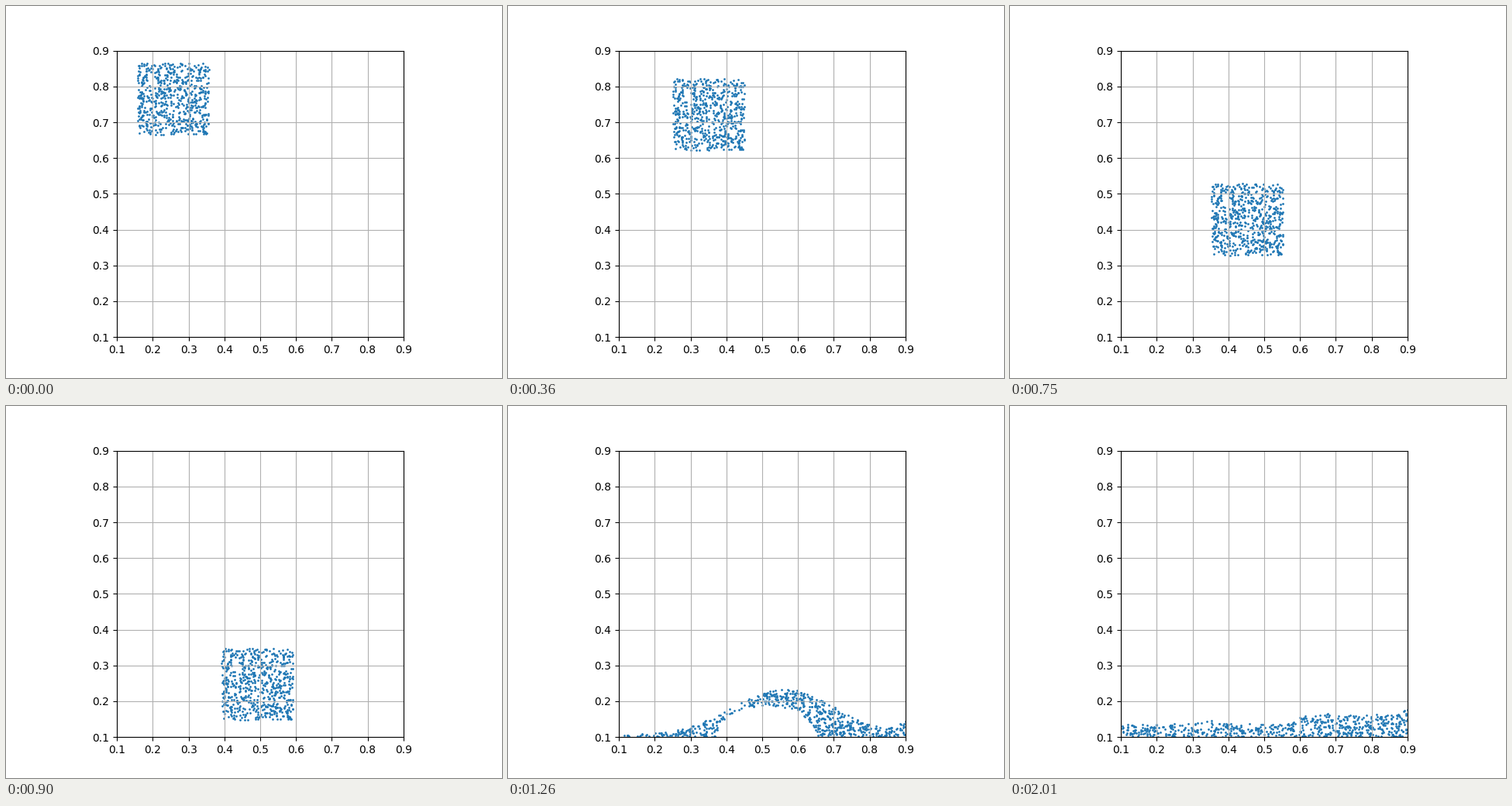
Animation of 640x480 px, one loop 2100 ms. Source, as a matplotlib script:

```python
import numpy as np
import matplotlib.pyplot as plt
from matplotlib.animation import FuncAnimation

FRAMES, STEP = 70, 30
LO, HI = 0.1, 0.9
IMPACT, LAST = 30, 67
SIDE = 0.2
START = np.array([0.1565, 0.6655])
VEL = np.array([0.00785, 0.00539])
GRAVITY = np.array([0, 0.00151])

rng = np.random.default_rng(7)
unit = rng.random((640, 2))


def flight(n):
    """Block in free flight."""
    return START + SIDE * unit + VEL * n - GRAVITY * n * n / 2


def hump(x, c, w, h, p=1.0):
    return h * np.clip(1 - ((x - c) / w) ** 2, 0, 1) ** p


def bell(x, c, w, h):
    return h * np.exp(-((x - c) / w) ** 2)


def step(x, c, w, h):
    return h * (1 + np.tanh((x - c) / w)) / 2


def fill(left, right, top, bottom):
    """Spread the particles evenly between two curves above the floor."""
    x = np.linspace(left, right, 400)
    low = bottom(x)
    high = np.maximum(top(x), low + 0.002)
    area = np.cumsum(high - low)
    area = (area - area[0]) / (area[-1] - area[0])
    px = np.interp(unit[:, 0], area, x)
    a, b = np.interp(px, x, low), np.interp(px, x, high)
    return np.column_stack([px, LO + a + unit[:, 1] * (b - a)])


squash = fill(0.355, 0.66,
              lambda x: hump(x, 0.508, 0.153, 0.198, 0.4),
              lambda x: hump(x, 0.5, 0.07, 0.025))
dome = fill(0.317, 0.725,
            lambda x: hump(x, 0.52, 0.207, 0.184),
            lambda x: hump(x, 0.49, 0.105, 0.058))
arch = fill(0.26, 0.818,
            lambda x: hump(x, 0.54, 0.28, 0.175, 1.6),
            lambda x: hump(x, 0.5, 0.12, 0.072))
wave = fill(LO, HI,
            lambda x: 0.006 + bell(x, 0.56, 0.2, 0.128) + bell(x, 0.92, 0.05, 0.04),
            lambda x: hump(x, 0.51, 0.14, 0.088, 0.5))
pool = fill(LO, HI,
            lambda x: (0.035 + step(x, 0.59, 0.02, 0.028)
                       + bell(x, 0.35, 0.05, 0.01) + bell(x, 0.9, 0.02, 0.02)),
            lambda x: 0 * x)
rest = pool + rng.normal(0, 0.0012, pool.shape)

times = np.array([IMPACT, 32, 34, 36, 42, 50, LAST])
poses = np.array([flight(IMPACT), squash, dome, arch, wave, pool, rest])
slopes = np.gradient(poses, times, axis=0)
slopes[0] = VEL - GRAVITY * IMPACT
slopes[-2:] = 0


def position(n):
    n = min(n, LAST)
    if n <= IMPACT:
        return flight(n)
    k = np.searchsorted(times, n) - 1
    h = times[k + 1] - times[k]
    s = (n - times[k]) / h
    p = ((1 + 2 * s) * (1 - s) ** 2 * poses[k]
         + s * (1 - s) ** 2 * h * slopes[k]
         + s * s * (3 - 2 * s) * poses[k + 1]
         + s * s * (s - 1) * h * slopes[k + 1])
    return np.clip(p, LO, HI)


fig, ax = plt.subplots(figsize=(6.4, 4.8), dpi=100)
ax.set_aspect("equal")
ax.set(xlim=(LO, HI), ylim=(LO, HI))
ax.set_xticks(np.linspace(LO, HI, 9))
ax.set_yticks(np.linspace(LO, HI, 9))
ax.grid(True)
dots = ax.scatter(*position(0).T, s=1)


def update(n):
    dots.set_offsets(position(n))
    return (dots,)


anim = FuncAnimation(fig, update, frames=FRAMES, interval=STEP, repeat=True,
                     repeat_delay=0)
plt.show()
```
